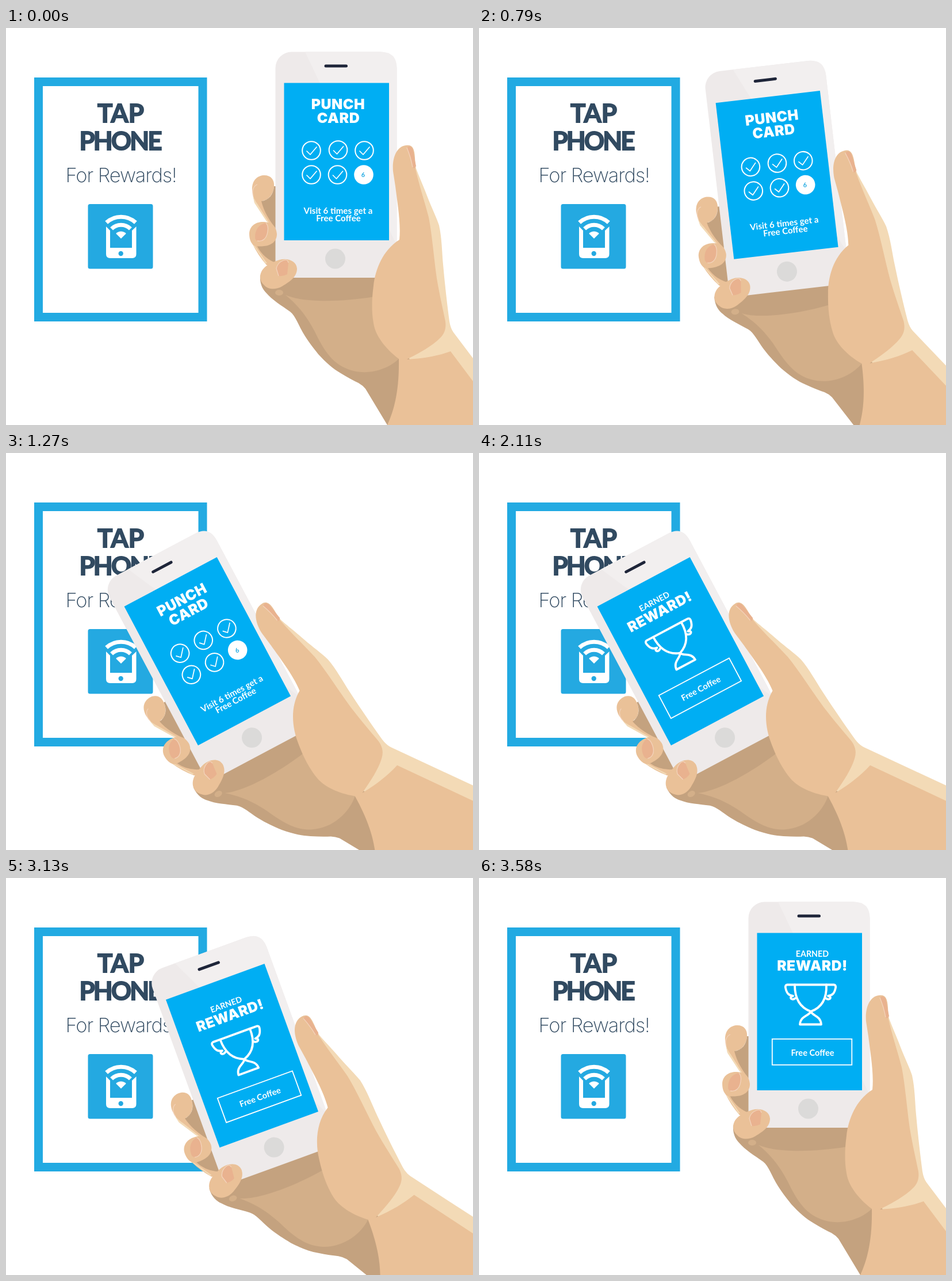
These frames come from a looping animation (812 by 690 pixels, 6.65 s). An HTML page:

```html
<!DOCTYPE html>
<html lang="en">
<head>
<meta charset="utf-8">
<title>Tap phone for rewards</title>
<style>
  html, body { margin: 0; width: 100%; height: 100%; overflow: hidden; background: #fff; }
  svg { display: block; width: 812px; height: 690px; }
  text { text-anchor: middle; }
  .title { font: 700 44px Lato, sans-serif; fill: #314a61; stroke: #314a61; stroke-width: 1.8; }
  .thin { font: 200 34.5px Inter, sans-serif; fill: #314a61; letter-spacing: -1.1px; }
  .heavy { font: 900 25px Inter, sans-serif; fill: #fff; letter-spacing: .5px; }
  .bold { font: 700 15.1px Lato, sans-serif; fill: #fff; }
  .skin { fill: #eac198; }
  .mid { fill: #d3af89; }
  .dark { fill: #c4a27f; }
  .glow { fill: #f3dab6; }
  .nail { fill: #e9b28f; }
  .rim { fill: none; stroke: #f3d3bb; stroke-width: 1.3; }
  .line { fill: none; stroke: #fff; stroke-linecap: round; stroke-linejoin: round; }
</style>
</head>
<body>
<svg viewBox="0 0 812 690">
  <defs>
    <g id="tick">
      <circle r="15.8" fill="#00aef3" stroke="#fff" stroke-width="2"/>
      <path class="line" stroke-width="1.7" d="M-8 1 L-2 7 L9 -6"/>
    </g>
  </defs>

  <g id="sign">
    <rect x="56.500" y="93.500" width="285.500" height="409" fill="#fff" stroke="#22aae2" stroke-width="15"/>
    <text class="title" x="199.500" y="164">TAP</text>
    <text class="title" x="198" y="212" letter-spacing="-3">PHONE</text>
    <text class="thin" x="200" y="268">For Rewards!</text>
    <rect x="142.500" y="306" width="113" height="112.500" rx="3.500" fill="#24a9e1"/>
    <path fill="#fff" d="M174 345 L181 352 V382 H219 V352 L226.500 345 V393 Q226.500 400 219.500 400 H181 Q174 400 174 393Z"/>
    <circle cx="199.700" cy="392" r="4.200" fill="#24a9e1"/>
    <g fill="none" stroke="#fff" stroke-width="7">
      <path d="M174.600 338.100 A37.500 37.500 0 0 1 225.400 338.100"/>
      <path d="M183.600 349 A23.500 23.500 0 0 1 216.400 349"/>
    </g>
    <path fill="#fff" d="M200 366 L191.200 357.200 A12.500 12.500 0 0 1 208.800 357.200Z"/>
  </g>

  <g id="hand">
    <!-- palm and the backs of the fingers -->
    <path class="dark" d="M442 430 C441 446 447 455 453 461 C462 472 480 483 494 493 C503 500 508 515 516 529 C526 546 533 554 543 567 C556 581 568 592 582 600 Q600 611 613 617 Q620 621 625 627 L663 690 L760 850 H840 L700 550 V420 H480Z"/>
    <path class="mid" d="M486 464 C515 477 580 477 640 467 V505 L684 574 C662 596 622 606 590 591 C562 579 548 550 536 526 C520 496 505 480 486 464Z"/>
    <ellipse class="mid" cx="475" cy="460" rx="7" ry="5"/>
    <path class="skin" d="M428 282 C427 263 439 256 449 256 C461 256 467 264 466 275 C465 290 455 300 446 300 L468 343 H472 V356 L455 338 L432 303Z"/>
    <path class="dark" d="M444 301 C457 299 465 290 466 275 H472 V352 Q450 326 444 301Z"/>
    <path class="glow" d="M429 291 Q434 302 438 307 L458 339 L453 336 L432 304Z"/>
    <path class="skin" d="M428 374 L443 377 Q455 395 472 402 V416 L453 412 Q438 395 428 374Z"/>
    <path class="dark" d="M436 378 C455 380 467 373 470 361 H474 V410 Q448 402 436 378Z"/>
    <path class="glow" d="M429 376 L433 379 L454 409 L451 409Z"/>

    <!-- phone -->
    <rect x="468.500" y="41.500" width="211" height="392.500" rx="28" fill="#eeeaea"/>
    <path fill="#f2efef" d="M520 41.500 H651.500 Q679.500 41.500 679.500 69.500 V378 Z"/>
    <rect x="553.500" y="63.500" width="40.500" height="5" rx="2.500" fill="#1e2539"/>
    <circle cx="572.500" cy="401" r="17.500" fill="#dbdad9"/>
    <rect x="483.500" y="95.500" width="182.500" height="273.500" fill="#00aef3"/>

    <g id="card">
      <text class="heavy" x="577.500" y="141">PUNCH</text>
      <text class="heavy" x="578" y="165">CARD</text>
      <use href="#tick" x="531" y="213"/>
      <use href="#tick" x="577.500" y="212"/>
      <use href="#tick" x="623" y="213"/>
      <use href="#tick" x="531" y="255"/>
      <use href="#tick" x="576.500" y="255"/>
      <circle cx="622" cy="255" r="16.800" fill="#fff"/>
      <text x="621" y="259" style="font:700 11px Lato,sans-serif" fill="#22aae2">6</text>
      <text class="bold" x="577.500" y="322.500">Visit 6 times get a</text>
      <text class="bold" x="578" y="336">Free Coffee</text>
      <g id="stamp"><use href="#tick"/></g>
    </g>

    <!-- finger tips -->
    <path class="rim" d="M430 292 C427 282 431 274 437 272"/>
    <path class="skin" d="M423 357 C424 342 437 336 449 337 C463 338 470 345 471 358 C471 372 460 378 449 379 C440 380 431 380 428 375 C424 370 423 363 423 357Z"/>
    <path class="nail" d="M433 364 C433 350 440 341 452 339 Q457 344 455 354 C453 367 445 372 437 370 Q433 368 433 364Z"/>
    <path class="rim" d="M452 339 Q457 344 455 354 C453 367 445 372 437 370"/>
    <path class="skin" d="M442 432 C443 416 458 409 475 403 C490 399 505 405 506 418 C506 432 495 440 480 449 C468 456 455 454 449 447 C444 442 442 438 442 432Z"/>
    <path class="nail" d="M470 418 Q472 408 482 404 Q490 401 491 408 L489 428 Q482 432 474 431Z"/>
    <path class="rim" d="M474 431 L470 418 Q472 408 482 404 Q490 401 491 408"/>

    <!-- thumb and arm -->
    <path class="glow" d="M709 225 L713 244 C718 258 726 275 733 294 C740 312 748 328 753 343 C758 365 758 390 760 411 C763 445 767 480 771 510 Q773 522 778 529 L873 655 L960 774 V900 H760 L720 600 L690 560Z"/>
    <path class="skin" d="M673 249 C671 224 680 206 695 204 C706 202 710 208 711 225 L712 245 C718 272 728 302 735 329 C741 360 744 400 749 435 C754 465 760 490 764 510 C766 527 760 535 748 545 C732 558 714 567 697 576 C728 574 750 570 773 562 L860 678 L950 798 V900 H788 L663 690 C675 664 684 630 683 575 C658 556 644 535 640 518 C635 495 636 470 639 448 C642 420 655 386 684 368 C687 340 680 300 677 275Z"/>
    <path class="nail" d="M697 208 Q703 203 707 210 L713 240 Q710 246 707 242 Q704 225 697 208Z"/>
    <path class="rim" d="M697 208 Q704 225 707 242"/>
  </g>

  <g id="reward">
    <text class="bold" x="579.500" y="137" style="font-size:14.3px">EARNED</text>
    <text class="heavy" x="579.500" y="160.500" style="font-size:24.600px">REWARD!</text>
    <g class="line" stroke-width="3.800">
      <path d="M549 185.500 H604 C605 212 594 226 577 232 C560 226 549 212 549 185.500Z"/>
      <path d="M549 185.500 H536 Q532 186 533 191 C535 201 539 204 546 205 Q540 207 543 210 Q546 212 550 209"/>
      <path d="M604 185.500 H617 Q621 186 620 191 C618 201 614 204 607 205 Q613 207 610 210 Q607 212 603 209"/>
      <path d="M577 232 C574 240 559 239 558 254.500 H595 C594 239 580 240 577 232Z"/>
    </g>
    <rect x="509.800" y="279.800" width="138.500" height="45" fill="none" stroke="#fff" stroke-width="1.800"/>
    <text class="bold" x="580" y="308.500" style="font-size:14.600px">Free Coffee</text>
  </g>
</svg>
<script>
  const LOOP = 6650, STEP = 30, TILT = -28;
  const CUT = 2110;
  const pivot = [688.5, 426], shift = [-146.8, 36.3];
  const mid = [579, 226], midShift = [-230.5, 115.5];
  const el = id => document.getElementById(id);
  const hand = el('hand'), card = el('card'), stamp = el('stamp'), reward = el('reward');

  // share done after whole steps, the first one landing at start
  const ramp = (t, start, steps) =>
    Math.max(0, Math.min(1, (Math.floor((t - start) / STEP) + 1) / steps));

  function place(node, [x, y], [dx, dy], p) {
    node.setAttribute('transform',
      `translate(${x + dx * p} ${y + dy * p}) rotate(${TILT * p}) translate(${-x} ${-y})`);
  }

  function draw(t) {
    const p = ramp(t, 670, 21) - ramp(t, 2980, 21);
    place(hand, pivot, shift, p);
    place(reward, mid, midShift, p);
    card.style.display = t < CUT ? '' : 'none';
    reward.style.display = t < CUT ? 'none' : '';
    const s = ramp(t, 1360, 17);
    stamp.setAttribute('transform', `translate(622 255) scale(${2.1 - 1.1 * s})`);
    stamp.setAttribute('opacity', s);
  }

  const begin = performance.now();
  function tick() {
    draw((performance.now() - begin) % LOOP);
    requestAnimationFrame(tick);
  }
  draw(0);
  requestAnimationFrame(tick);
</script>
</body>
</html>
```
